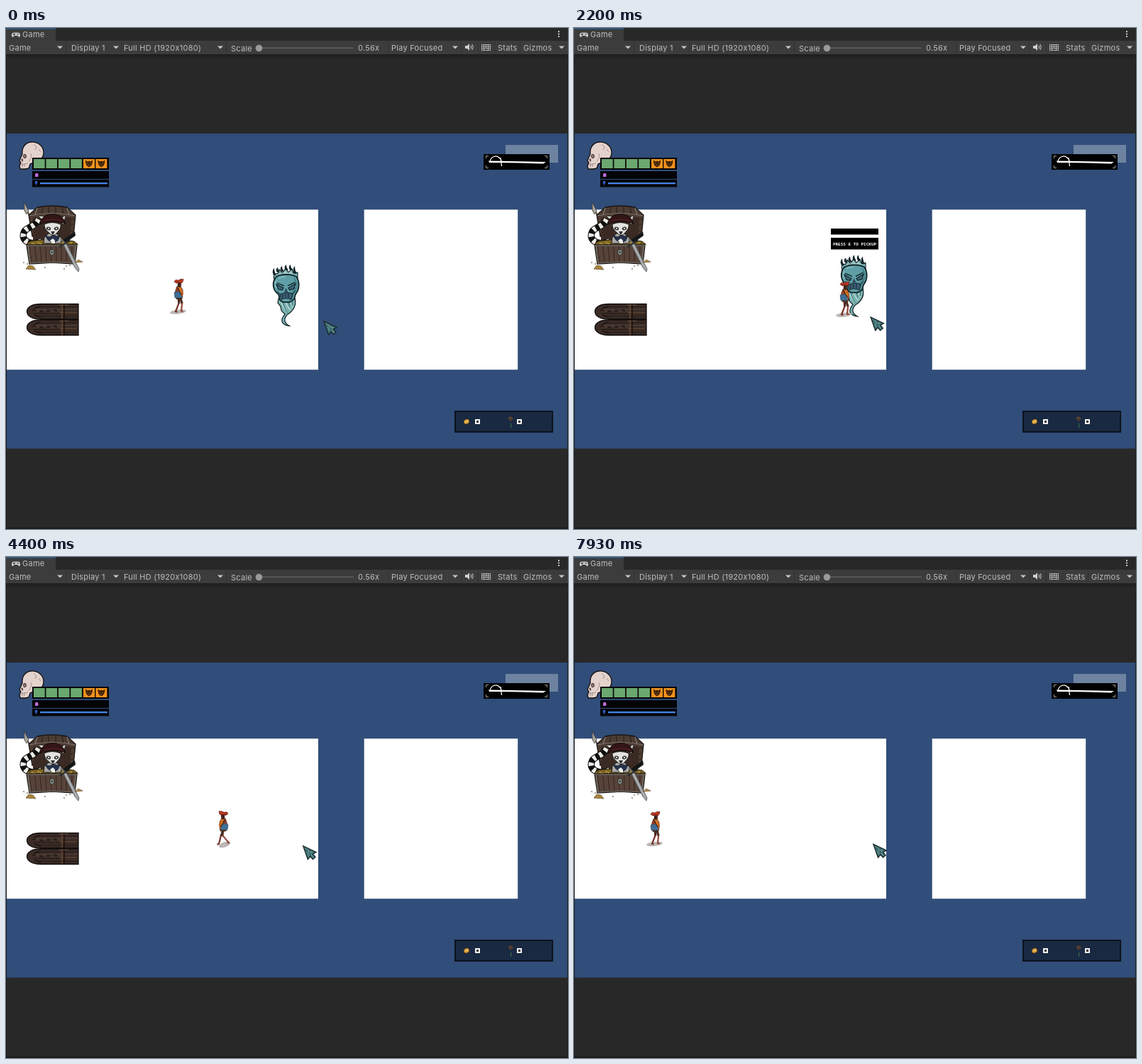
Write an HTML page with a canvas that moves like this. It is 792 by 707 pixels and loops after 8000 ms.

```html
<!DOCTYPE html>
<html lang="en">
<head>
<meta charset="utf-8">
<title>Game view</title>
<style>
html, body { margin: 0; width: 100%; height: 100%; overflow: hidden; background: #282828; }
canvas { display: block; width: 792px; height: 707px; }
</style>
</head>
<body>
<canvas id="stage" width="792" height="707"></canvas>
<script>
const ctx = document.getElementById('stage').getContext('2d');
const LOOP = 8000, STEP = 1000 / 15;
const PICKUP = 3.87, DOOR_GONE = 7.4;
const UI_FONT = '11px Inter, Roboto, sans-serif';

// --- helpers ---
function box(x, y, w, h, color) {
  ctx.fillStyle = color;
  ctx.fillRect(x, y, w, h);
}
function shape(d, fill, stroke, width = 1) {
  const p = new Path2D(d);
  if (fill) { ctx.fillStyle = fill; ctx.fill(p); }
  if (stroke) { ctx.strokeStyle = stroke; ctx.lineWidth = width; ctx.stroke(p); }
}
const line = (d, color, width = 1) => shape(d, null, color, width);
function oval(x, y, rx, ry, fill, stroke, width = 1, turn = 0) {
  ctx.beginPath();
  ctx.ellipse(x, y, rx, ry, turn, 0, 7);
  if (fill) { ctx.fillStyle = fill; ctx.fill(); }
  if (stroke) { ctx.strokeStyle = stroke; ctx.lineWidth = width; ctx.stroke(); }
}
function label(s, x, y) {
  ctx.font = UI_FONT;
  ctx.letterSpacing = '0.25px';
  ctx.textAlign = 'left';
  ctx.fillStyle = '#bebebe';
  ctx.fillText(s, x, y);
  ctx.letterSpacing = '0px';
}
function at(x, y, draw, flip = 1) {
  ctx.save();
  ctx.translate(x, y);
  ctx.scale(flip, 1);
  draw();
  ctx.restore();
}
// linear track of [time, ...values]
function track(keys, t) {
  let i = 0;
  while (i < keys.length - 2 && t >= keys[i + 1][0]) i++;
  const a = keys[i], b = keys[i + 1];
  const k = Math.min(1, Math.max(0, (t - a[0]) / (b[0] - a[0])));
  return a.slice(1).map((v, j) => v + (b[j + 1] - v) * k);
}

// --- editor frame ---
function editor() {
  box(0, 0, 792, 707, '#282828');
  box(0, 0, 70, 18, '#3c3c3c');
  box(0, 0, 70, 1.5, '#2c5d87');
  box(0, 18, 792, 19, '#3c3c3c');
  const shade = ctx.createLinearGradient(0, 37, 0, 44);
  shade.addColorStop(0, '#1d1d1d');
  shade.addColorStop(1, '#282828');
  ctx.fillStyle = shade;
  ctx.fillRect(0, 37, 792, 7);
  box(0, 37, 1, 670, '#1c1c1c');
  box(791, 37, 1, 670, '#1c1c1c');
  box(0, 705, 792, 2, '#1a1a1a');

  shape('M10 6.500H18C21 8 20.500 13 18.500 13L16 11H12L9.500 13C7.500 13 7 8 10 6.500Z', '#c4c4c4');
  box(10, 8.5, 3, 1, '#3c3c3c');
  box(11, 7.5, 1, 3, '#3c3c3c');
  box(16, 8, 1.5, 1.5, '#3c3c3c');
  label('Game', 23, 13);
  for (const y of [4, 7.5, 11]) box(778, y, 2, 2, '#c4c4c4');

  for (const x of [84, 162, 310, 538, 641, 665, 688, 724]) box(x, 19, 1, 17, '#323232');
  const texts = [['Game', 4], ['Display 1', 92], ['Full HD (1920x1080)', 166], ['0.56x', 496],
    ['Play Focused', 543], ['Stats', 693], ['Gizmos', 729]];
  for (const [s, x] of texts) label(s, x, 31.5);
  label('Scale', 317, 32.5);
  for (const x of [76, 155, 302, 633, 783]) shape(`M${x - 4} 25.500H${x + 4}L${x} 29.500Z`, '#c4c4c4');
  box(356, 27.5, 134, 1.5, '#5e5e5e');
  oval(356.5, 28.5, 4.8, 4.8, '#999');

  shape('M647 25H650L653 22V32L650 29H647Z', '#d0d0d0');
  line('M655 24.500Q656.500 27 655 29.500M657 23Q659.500 27 657 31', '#d0d0d0');
  line('M670.500 23.500H682.500V31.500H670.500Z M670 26.200H683M670 28.800H683M673.500 23V32M676.500 23V29M679.500 23V32', '#bbb', 0.9);
}

// --- HUD ---
function skull() {
  shape('M23 178C22 170 26 162 35 161C45 160 53 167 53 176C53 182 50 185 46 186L38 190L34 192L32 198L27 199L20 199L19 194L21 190L19 187Z', '#e4d2cd', '#15100f', 1.3);
  oval(26.5, 181, 2, 2.8, '#8b7975', '#3a2d2b', 0.9);
  shape('M21 186L23.500 184L24 189Z', '#3d302f');
  line('M20 193.500L31 191M23 191V197M26 191V196M32 188C35 185 37 181 35 177M39 164L43 168L41 172M46 171L49 175', '#95827d', 0.8);
}
function hud() {
  skull();
  box(37, 183, 108, 17, '#060606');
  for (let i = 0; i < 4; i++) box(39 + i * 17.4, 185, 15.7, 13, '#6ba870');
  for (const x of [109, 126.4]) {
    box(x, 185, 16, 13, '#f3921d');
    at(x + 8, 191.5, () => {
      shape('M-5 -5L-2 -3L0 -4L2 -3L5 -5C5 0 4 3 0 5C-4 3 -5 0 -5 -5Z', '#3e2108');
      line('M-3 -1L-1 0M3 -1L1 0M-1.500 2.500H1.500', '#b46a18', 0.8);
    });
  }
  box(37, 202, 108, 11, '#040407');
  shape('M41 210V207C41 204 45.500 204 45.500 207V210Z', '#c06ad6');
  box(37, 214, 108, 10.5, '#040407');
  oval(42.5, 218, 1.8, 2.2, '#2f62c4');
  box(42, 219, 1, 3, '#2f62c4');
  box(48, 218, 95, 2.3, '#4583e6');

  box(704, 165, 74, 25, '#6e83a1');
  box(673, 178, 93, 22, '#000');
  line('M676.500 184V180.500H680M759 180.500H762.500V184M676.500 194V197.500H680M759 197.500H762.500V194', '#999');
  shape('M680 187.500L698 187.800L738 188.500L761 189L757 191.500L725 190.500L698 190L681 190Z', '#fff');
  line('M682 189C683 181 691 179 695 183Q698 185 698 189M697 183L698.500 195', '#fff', 1.3);

  box(632, 540, 139, 31, '#0c121d');
  box(634, 542, 135, 27, '#1a2942');
  oval(649, 555.5, 4, 3.3, '#d9a441', '#5d3d12', 0.8, -0.4);
  line('M647 556L651 554', '#f5d684', 1);
  for (const x of [661, 720]) {
    box(x, 552, 7, 7, '#f2f2f2');
    box(x + 2, 554, 3, 3, '#2a2a33');
  }
  line('M708 552C709 548 713 548 714 552M709 552H714M711 549V555', '#6b4629', 1.2);
  line('M711.500 558V564', '#316b4a', 1.2);
}

// --- treasure chest ---
function chest() {
  line('M28 252L43 292', '#4c382b', 1.8);
  shape('M25.500 246L32 258L29 263L26 258Z', '#a8a69d', '#3a3835', 0.8);
  shape('M32 264L44 253Q65 249 86 253L98 264L95 294H37Z', '#4d3c32', '#1b1412', 1.3);
  line('M33 265Q65 258 97 265M44 254L41 264M86 254L89 264', '#807b74', 1.2);
  line('M52 253L50 262M60 252V261M70 252V261M79 253L81 262M90 270L96 269M90 278L95 277M89 286L95 286', '#271a15', 1);
  shape('M38 268Q65 261 92 268L90 303H38Z', '#3a2a23');

  // striped tail
  const tail = 'M50 301C34 308 21 300 25 289C27 281 39 283 46 270';
  line(tail, '#101010', 9.5);
  ctx.setLineDash([4.5, 5.5]);
  line(tail, '#ecebe5', 7.5);
  ctx.setLineDash([]);

  shape('M29 305L33 301Q64 296 96 301L101 305L96 310H32Z', '#7d6625', '#28200c', 1);
  for (let i = 0; i < 22; i++) oval(34 + i * 2.9, 303 + i * 5 % 4, 1.6, 0.9, i % 3 ? '#b3933a' : '#56461a');
  shape('M53 304L54 295L60 290H71L79 297L77 304Z', '#aaa9a5', '#171717', 1);
  shape('M55 293L62 295L66 292L72 294L76 293L73 300L66 304L59 299Z', '#25314c', '#11151e', 0.7);
  shape('M62 300L65 304H69L69 300L66 297Z', '#efefeb');
  shape('M54 273L45 265L56 266ZM76 270L84 264L81 278Z', '#e8e8e2', '#222', 0.8);
  shape('M54 277Q65 272 77 277C78 284 73 287 69 292H64C60 288 54 285 54 277Z', '#e4e3df', '#171717', 0.9);
  for (const [x, tilt] of [[60, 0.3], [71, -0.3]]) {
    oval(x, 283, 3.2, 2.4, '#3a3a3a', null, 1, tilt);
    oval(x, 283, 1.1, 1, '#eee');
  }
  shape('M63 287H69L67 291H65Z', '#333');
  shape('M47 277C48 271 54 263 62 263C74 261 81 267 84 276C74 272 58 272 47 277Z', '#321517', '#120b0b', 1);
  line('M53 273Q67 267 80 273', '#5c2426', 1);

  shape('M29 306L100 306L97 333L66 331L33 333Z', '#57433a', '#191310', 1.4);
  for (let i = 0; i < 9; i++) line(`M${33 + i * 7.5} 308L${36 + i * 7} 331`, '#34261f', 1);
  line('M29 307H100M33 332Q66 329 97 332', '#6b6761', 1.5);
  line('M31 308L34 332M98 308L96 332', '#6d6962', 2);
  shape('M62 313H67.500V319L64.500 321L62 319Z', '#85938a', '#262a27', 0.8);
  box(64, 315, 1.3, 3, '#222');

  shape('M79 300L97 287L98 293L84 303Z', '#131817');
  line('M77 297L85 306', '#6d6f6d', 2);
  shape('M81 306L85 304L103 340L102 344L97 338Z', '#a7aaac', '#494c50', 0.8);
  line('M75 309L90 300', '#272b2b', 2);

  shape('M28 340L32 335L38 336L42 341Z', '#aa863b', '#5e4821', 0.7);
  shape('M97 331L102 327L108 330Z', '#b9944a', '#5e4821', 0.7);
  for (const [x, y] of [[25, 331], [30, 333], [55, 338], [82, 340], [90, 335], [85, 336]])
    oval(x, y, 1, 0.8, '#594930');
}

function door() {
  for (const y of [389, 411.5]) at(0, y, () => {
    shape('M102 0.500H49C36 0.500 29.500 5 29.500 11C29.500 17 36 22 49 22H102Z', '#3b2c27', '#0f0b0a', 1.3);
    for (const k of [4.5, 8, 14, 18]) line(`M${36 + Math.abs(11 - k)} ${k}H101`, k === 8 ? '#4f4039' : '#211814', 1);
    for (let i = 0; i < 8; i++) line(`M${37 + i * 5} ${10 + i % 3}l3 -2l2 3`, i % 2 ? '#5d4739' : '#110d0c', 1);
    line('M79 1V22M75 2H88M76 13H100', '#614532', 1.6);
    line('M82 2V22M39 7L48 4M40 16L49 19', '#110c0a', 1.3);
  });
  box(47, 410, 55, 1.5, '#0e0a09');
}

// --- ghost, prompt ---
function ghost() {
  const ink = '#0e2024';
  shape('M384 382L383 388L387 393L388 399L393 404C387 411 387 417 396 420L399 420.500C392 416 391 411 396 405C404 400 410 392 407 381Z', '#7ab3b1', ink, 1.2);
  line('M388 387Q391 396 397 401M394 387Q397 395 401 398M401 386Q402 393 404 394', '#c5e3dd', 1.2);
  line('M390 388Q393 397 397 402M398 387L400 394M404 385L403 392', '#28595f', 0.9);

  // flame hair
  shape('M378 355C376 348 379 346 383 347L385 341L390 346L394 339L398 345L403 340L405 346L411 345L411 356Z', '#84b8b8', ink, 1.1);
  for (const [x, y, h] of [[379, 349, 10], [384, 345, 7], [390, 344, 8], [396, 342, 8], [402, 342, 8], [408, 347, 11]])
    shape(`M${x - 2} ${y}Q${x - 5} ${y - h * 0.6} ${x - 1} ${y - h}Q${x - 1} ${y - h * 0.4} ${x + 2} ${y}Z`, ink);
  line('M382 351Q385 346 389 349M389 347Q394 342 397 348M398 346Q402 343 404 349', '#d0e5e2', 1);

  shape('M381 351C388 347 402 347 409 351C414 358 414 369 408 376L406 383L400 387H390L386 384L384 376C376 371 374 359 381 351Z', '#5f9ea5', ink, 1.8);
  shape('M405 351C412 358 412 369 406 375L403 385L399 386L402 374L409 365Z', '#437e89');
  line('M384 354Q388 351 394 351M381 356Q378 362 381 367', '#8fc0c2', 1.3);
  shape('M381 362L391 367L389 370L384 369Z', '#3e6478', ink, 1.1);
  shape('M408 361L398 367L400 370L406 368Z', '#3e6478', ink, 1.1);
  line('M382 360L392 364M407 359L397 364', ink, 1.4);
  shape('M394.500 367L392 373H397.500Z', '#2f4b60');
  shape('M386 376Q395 372 404 375L402 383Q394 380 388 383Z', '#3c5f73', ink, 0.9);
  line('M390 376V381M394 375V380M398 375V381M382 371L386 376M408 371L404 376', ink, 0.9);
}
function prompt(fill) {
  box(362, 297, 67, 8.5, '#000');
  box(363, 298, 65 * fill, 6.5, '#fff');
  box(362, 310, 67, 16.5, '#000');
  ctx.font = 'bold 6px "Noto Sans Mono", "DejaVu Sans Mono", monospace';
  ctx.textAlign = 'center';
  ctx.fillStyle = '#fff';
  ctx.fillText('PRESS E TO PICKUP', 395.5, 320.5);
}

// --- player, facing right ---
function leg(hip, knee, foot, y, color) {
  line(`M${hip} 25L${knee} 35`, '#4a2a22', 3.2);
  line(`M${knee} 34L${foot} ${y}L${foot + 2.5} ${y + 0.7}`, color, 2.2);
}
function player(walk, swing, breath) {
  if (walk) oval(-2, 47, 8.5, 3.6, '#bcb6b4', null, 1, 0.35);
  else oval(-1.5, 46.5, 11.5, 3, '#bcb6b4', null, 1, -0.12);

  const reach = walk ? swing * 7 : 4;
  leg(-1, 1 - reach * 0.3, -1 - reach, 46, '#75352a');
  leg(1, 3 + reach * 0.3, -1 + reach, 47 - Math.abs(reach) * 0.4, '#94493a');

  at(0, breath, () => {
    shape('M-3 10L2 10L5 15L5 22L4 28H-4L-5 18Z', '#d9771f', '#3e2118', 0.7);
    shape('M-3 11L-5 15L-6 21L-3 22L0 14Z', '#a43f26', '#3e2118', 0.5);
    shape('M-7 19L-2 17L3 20L5 25L1 27L-6 26Z', '#3f6e96', '#283746', 0.6);
    line('M-3 11L4 23M-4 27H4', '#32211f', 1.1);
    line('M3 13L5 19L4 24', '#bd5a20', 1.8);
    oval(0.5, 8, 2.7, 3.4, '#35201b');
    oval(2, 8.5, 1, 1.6, '#734031');
    shape('M-5 1L-1 1.500L2 0L6 0L5 4L3 5.500H-4L-7 3.500Z', '#bf3820', '#571c14', 0.7);
    line('M-4 4.500H3', '#6e1e17', 1);
  });
}

function cursor() {
  shape('M0 0L18 8.500L13.500 11L17 15.500L13.500 18.500L10 14.500L6.500 18.500Z', '#477d7e', '#1b2c31', 1.5);
  line('M2 2L12 9M8 4L7 12M5 8L13 8M11 12L14 16', '#6d9793', 0.8);
  line('M3 4L7 9M9 9L10 13M8 5L10 8', '#294b51', 1);
}

// x, y of player; x, y of pointer tip
const WALK = [[0, 244, 354], [0.79, 244, 354], [1.2, 297, 356.5], [1.855, 382, 358], [2.6, 382, 358.5],
  [3.827, 382, 359], [6.09, 82, 358.5], [6.2, 82, 358.5], [6.45, 115, 358.5], [8, 115, 358.5]];
const POINTER = [[0, 448, 414], [0.15, 448, 414], [0.65, 418, 408.5], [3.9, 418.5, 408], [4.6, 419, 408],
  [4.9, 422, 405.5], [8, 422, 405.5]];

function scene(t) {
  editor();
  box(1, 149, 790, 444.5, '#314d79');
  box(1, 256.3, 439, 225.9, '#fff');
  box(504.7, 256.3, 216.5, 225.9, '#fff');
  hud();
  chest();
  if (t < DOOR_GONE) door();

  const bob = -6.2 + 9 * Math.cos(t / 1.73 * 2 * Math.PI + 0.84);
  if (t < PICKUP) at(0, bob, ghost);

  const [x, y] = track(WALK, t);
  const pace = track(WALK, t + 0.02)[0] - x;
  const walking = Math.abs(pace) > 0.3;
  const face = walking ? Math.sign(pace) : 1;
  const swing = Math.sin(7.34 * (t - 1.2));
  at(x, y, () => player(walking, swing, walking ? 0 : 0.5 + 0.5 * Math.sin(t * 5)), face);

  if (t > 1.8 && t < PICKUP)
    at(0, Math.round(bob), () => prompt(Math.min(1, Math.max(0, (t - 2.32) / 1.52))));
  at(...track(POINTER, t), cursor);
}

const start = performance.now();
function frame() {
  const ms = (performance.now() - start) % LOOP;
  scene(Math.floor((ms + 4) / STEP) * STEP / 1000);
  requestAnimationFrame(frame);
}
frame();
</script>
</body>
</html>
```
